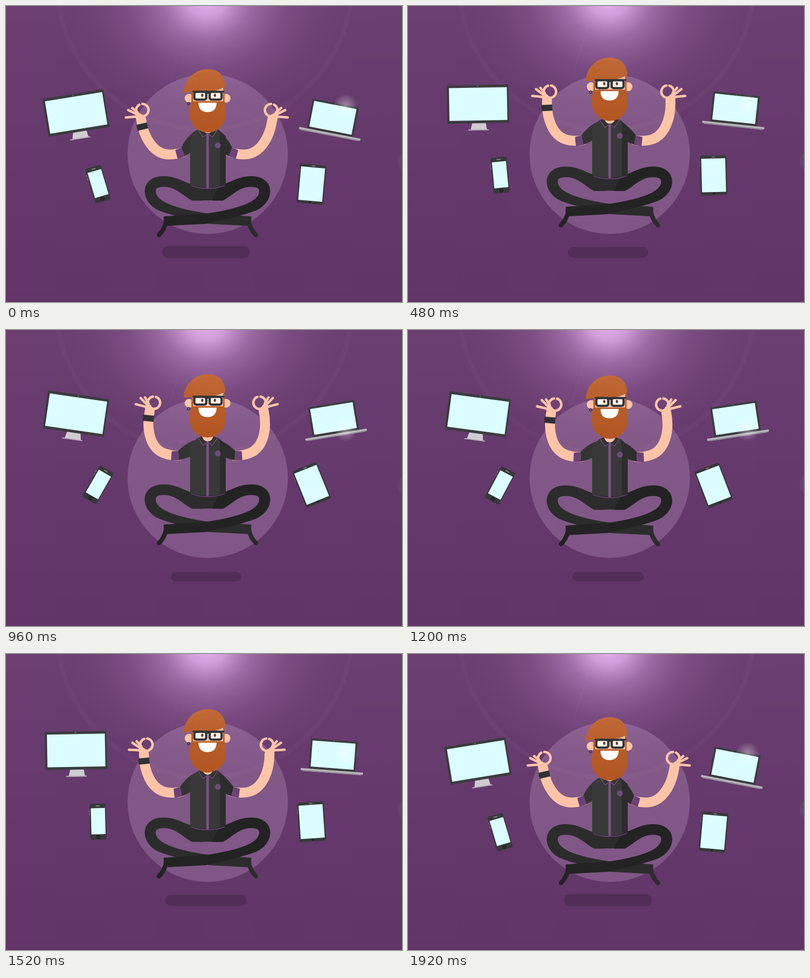
Animation, 800 px wide and 600 px high, one loop 2 s. Source, as an HTML page:

```html
<!DOCTYPE html>
<html lang="en">
<head>
<meta charset="utf-8">
<title>Levitating developer</title>
<style>
  html, body { margin: 0; width: 100%; height: 100%; overflow: hidden; background: #63376b; }
  svg { display: block; width: 100vw; height: 100vh; }
</style>
</head>
<body>
<svg viewBox="0 0 800 600">
  <defs>
    <linearGradient id="sky" x2="0" y2="1">
      <stop stop-color="#6b3f70"/>
      <stop offset=".5" stop-color="#65396c"/>
      <stop offset="1" stop-color="#613567"/>
    </linearGradient>
    <radialGradient id="glow" gradientUnits="userSpaceOnUse" cx="0" cy="0" r="260"
      gradientTransform="translate(405 -12) scale(1.15 1)">
      <stop stop-color="#e6b0f0"/>
      <stop offset=".13" stop-color="#d8a4e1" stop-opacity=".92"/>
      <stop offset=".3" stop-color="#c08aca" stop-opacity=".58"/>
      <stop offset=".55" stop-color="#a670b0" stop-opacity=".28"/>
      <stop offset=".75" stop-color="#9a66a4" stop-opacity=".12"/>
      <stop offset="1" stop-color="#8a5a94" stop-opacity="0"/>
    </radialGradient>
    <radialGradient id="glint">
      <stop stop-color="#fff" stop-opacity=".4"/>
      <stop offset="1" stop-color="#fff" stop-opacity="0"/>
    </radialGradient>
    <linearGradient id="hair" x2="0" y2="1">
      <stop stop-color="#c26a38"/>
      <stop offset="1" stop-color="#b9602c"/>
    </linearGradient>
    <linearGradient id="beard" x2="0" y2="1">
      <stop stop-color="#bb5e2a"/>
      <stop offset="1" stop-color="#b25724"/>
    </linearGradient>

    <g id="forearm" fill="none" stroke="#fec4a8" stroke-linecap="round">
      <path d="M358 296Q345 301 330 301C298 301 278 266 273 230" stroke-width="20"/>
      <path d="M268 224L272 228" stroke-width="14"/>
      <path d="M275.500 198.500A12.500 12.500 0 1 1 269.500 200" stroke-width="5"/>
      <path d="M265 224L242 226M263 219L247 211M266 216L255 207" stroke-width="5"/>
    </g>
    <g id="sleeve">
      <path d="M392 251L386 251Q366 262 354 287L361 305L374 296L392 280Z"/>
      <path d="M354 287L342 292Q344 301 347 310L361 305Z" fill="#6b4279"/>
    </g>
    <g id="leg">
      <path d="M375 362C352 354 342 345.500 318 345.500C270 345.500 270 397 309 414C340 426 375 432 410 441L495 445.500V427
        L407 421C355 413 302 400 302 375C302 367 312 366 320 366C343 366 357 384 376 394H397Q391 374 375 362Z"/>
      <path d="M490 436Q495 455 505 464" fill="none" stroke-width="9" stroke-linecap="round"/>
    </g>
  </defs>

  <rect width="800" height="600" fill="url(#sky)"/>
  <rect width="800" height="300" fill="url(#glow)"/>
  <circle cx="401" cy="-48" r="298" fill="none" stroke="#c9a0d0" stroke-width="9" opacity=".045"/>
  <path d="M367 30L330 150" stroke="#c9a0d0" stroke-width="2" opacity=".05"/>
  <circle cx="810" cy="315" r="19" fill="#fff" opacity=".04"/>
  <circle cx="407.500" cy="300" r="162" fill="#e2c5e8" opacity=".22"/>
  <rect id="shadow" x="-89" y="-12" width="178" height="24" rx="12" fill="#522d58"/>

  <g id="monitor">
    <path d="M-12 38H15L17.500 52H-15.500Z" fill="#cfcbd1"/>
    <path d="M-20.500 51.500H21V53.500H-20.500Z" fill="#b9b1bd"/>
    <rect x="-62.500" y="-38.500" width="125" height="77.500" rx="2" fill="#3a3c3f"/>
    <rect x="-58" y="-33" width="117" height="66.500" fill="#dbfdff"/>
    <circle cy="-36" r="1.300" fill="#777"/>
  </g>

  <g id="laptop">
    <rect x="-47.500" y="-64" width="95" height="62" rx="2" fill="#3a3c3f"/>
    <rect x="-43.500" y="-60" width="87" height="53" fill="#dbfdff"/>
    <circle cy="-62" r="1" fill="#777"/>
    <path d="M-63 -2.500H63V1.500L58 3H-58L-63 1.500Z" fill="#b9b6bc"/>
    <path d="M-63 1L-58 3H58L63 1Z" fill="#928c98"/>
  </g>
  <circle cx="686" cy="202" r="24" fill="url(#glint)"/>

  <g id="phone">
    <path d="M-17 -24V-20M-17 -17V-13" stroke="#8d8592" stroke-width="1.500"/>
    <rect x="-16.500" y="-36.500" width="33" height="73" rx="4" fill="#37393b"/>
    <rect x="-14" y="-27.500" width="28.500" height="53" fill="#dbfdff"/>
    <path d="M-4 -32H4" stroke="#858585" stroke-width="2"/>
    <circle cy="31" r="4" fill="#1f2021"/>
    <path d="M-2 32.500L2 29.500" stroke="#555" stroke-width="1"/>
  </g>

  <g id="tablet">
    <path d="M-27 -28V-24M-27 -22V-18" stroke="#8d8592" stroke-width="1.500"/>
    <rect x="-27" y="-40" width="54" height="80" rx="4" fill="#37393b"/>
    <rect x="-24" y="-34" width="48.500" height="68" fill="#dbfdff"/>
    <path d="M-3 -37H4" stroke="#858585" stroke-width="1.800"/>
    <circle cy="37" r="2" fill="#1f2021"/>
  </g>

  <g id="body">
    <path d="M372 361Q407 373 443 361L438 394H375Z" fill="#2c2c2c"/>
    <use href="#leg" fill="#2c2c2c" stroke="#2c2c2c"/>
    <use href="#leg" fill="#232323" stroke="#232323" transform="translate(814) scale(-1 1)"/>

    <g id="leftArm">
      <use href="#forearm"/>
      <path d="M264.500 247L286 242" stroke="#303133" stroke-width="12.500"/>
      <use href="#sleeve" fill="#343434"/>
    </g>
    <g transform="translate(811) scale(-1 1)">
      <g id="rightArm">
        <use href="#forearm"/>
        <use href="#sleeve" fill="#2d2d2d"/>
      </g>
    </g>

    <path d="M388 250L372 264V362Q407 373 444 362V264L428 250Z" fill="#393939"/>
    <path d="M428 250Q432 256 432 268V365L444 362V264Z" fill="#2d2d2d"/>
    <path d="M388 251L398 265L407.500 259L417 265L427 251L419 247H396Z" fill="#333"/>
    <path d="M396 247H419Q416 258 407.500 258T396 247Z" fill="#fec4a8"/>
    <path d="M388 251L398 265.500L407.500 259L417 265.500L427 251" fill="none" stroke="#7b5285" stroke-width="1.300"/>
    <path d="M407.300 260V369" stroke="#7b5285" stroke-width="5"/>
    <path d="M374 364Q407 376 442 364" fill="none" stroke="#6b4279" stroke-width="1.500"/>
    <circle cx="428" cy="282.500" r="6" fill="#714a7c"/>
  </g>

  <g id="head">
    <circle cx="370" cy="187" r="9" fill="#fec4a8"/>
    <circle cx="444.500" cy="187" r="9" fill="#fec4a8"/>
    <circle cx="369" cy="198" r="2.500" fill="none" stroke="#383038" stroke-width="1.500"/>
    <path d="M376 160H440V200H376Z" fill="#fec4a8"/>
    <path d="M374.500 172H378V193H438.500V163H441.500V194Q444 206 444 220A36.500 36.500 0 0 1 371 220Q371 206 374.500 194Z" fill="url(#beard)"/>
    <path d="M389 196H425.500Q425 215 407 215T389 196Z" fill="#fff"/>
    <path d="M359 176C359 151 380 128 407 128C432 128 443 144 443 163C430 171 420 173 400 173Q376 173 359 176Z" fill="url(#hair)"/>
    <path d="M378 172C370 152 384 136 410 136C430 136 438 146 440 160" fill="none" stroke="#a9531f" opacity=".2"/>
    <g fill="#fbf5ee" stroke="#303437" stroke-width="4.500">
      <rect x="380.500" y="174" width="24" height="15.800" rx="4"/>
      <rect x="411.500" y="174" width="24" height="15.800" rx="4"/>
      <path d="M377 173.500H441M404 176H412" stroke-width="3.500"/>
    </g>
    <ellipse cx="396.500" cy="181" rx="2.300" ry="3.300" fill="#6b3d28"/>
    <ellipse cx="422" cy="181" rx="2.300" ry="3.300" fill="#6b3d28"/>
  </g>
</svg>
<script>
const LOOP = 2000, STEP = 40, LAST = 1920;
const el = id => document.getElementById(id);

// Smooth curve through [time, value] points, at rest at both ends.
function track(...pts) {
  const slope = i => i === 0 || i === pts.length - 1 ? 0 :
    (pts[i + 1][1] - pts[i - 1][1]) / (pts[i + 1][0] - pts[i - 1][0]);
  return t => {
    let i = 0;
    while (i < pts.length - 2 && t > pts[i + 1][0]) i++;
    const [t0, a] = pts[i], [t1, b] = pts[i + 1];
    const d = t1 - t0, u = (t - t0) / d, v = 1 - u;
    return v * v * (1 + 2 * u) * a + u * u * (3 - 2 * u) * b +
      d * u * v * (v * slope(i) - u * slope(i + 1));
  };
}

const lift = track([0, 0], [320, .27], [480, .65], [560, .83], [720, 1], [960, 1.07],
  [1120, 1.05], [1200, 1], [1520, .45], [1680, .17], [LAST, 0]);
const reach = track([0, 0], [320, .225], [480, .57], [560, .77], [720, 1], [960, 1.06],
  [1200, 1], [1520, .43], [1680, .15], [LAST, 0]);
const drift = track([0, 0], [320, .11], [480, .39], [720, .91], [1000, 1.03],
  [1200, 1], [1520, .46], [1680, .19], [LAST, 0]);
const turn = track([0, 0], [320, .08], [480, .25], [720, .89], [1020, 1.05],
  [1200, 1], [1520, .34], [1680, .13], [LAST, 0]);
const tilt = track([0, 0], [320, .24], [480, .49], [720, .91], [1020, 1.05],
  [1200, 1], [1520, .49], [LAST, 0]);
const shrink = track([0, 0], [320, .17], [480, .46], [720, .94], [960, 1.05],
  [1200, 1], [1520, .41], [LAST, 0]);

const move = (id, x, y, extra = "") =>
  el(id).setAttribute("transform", `translate(${x} ${y}) ${extra}`);
const place = (id, x, y, angle) => move(id, x, y, `rotate(${angle})`);

function draw(t) {
  const up = lift(t), swing = 18.2 * reach(t), dy = -46 * drift(t), k = turn(t), s = shrink(t);

  move("body", 0, -30 * up);
  move("head", 0, -36 * up);
  for (const id of ["leftArm", "rightArm"])
    el(id).setAttribute("transform", `rotate(${swing} 380 264)`);
  move("shadow", 404, 499 + s, `scale(${1 - .19 * s})`);

  place("monitor", 141.2, 216.5 + dy, -9.3 + 16.9 * tilt(t));
  place("laptop", 654 + 12.5 * k, 259.5 + dy, 11 - 19.6 * k);
  place("phone", 186, 361 + dy, -16.5 + 44.5 * k);
  place("tablet", 617.2, 361 + dy, 5 - 26 * k);
}

const start = performance.now();
function frame() {
  const t = (performance.now() - start) % LOOP;
  draw(Math.min(LAST, Math.floor(t / STEP) * STEP));
  requestAnimationFrame(frame);
}
frame();
</script>
</body>
</html>
```
